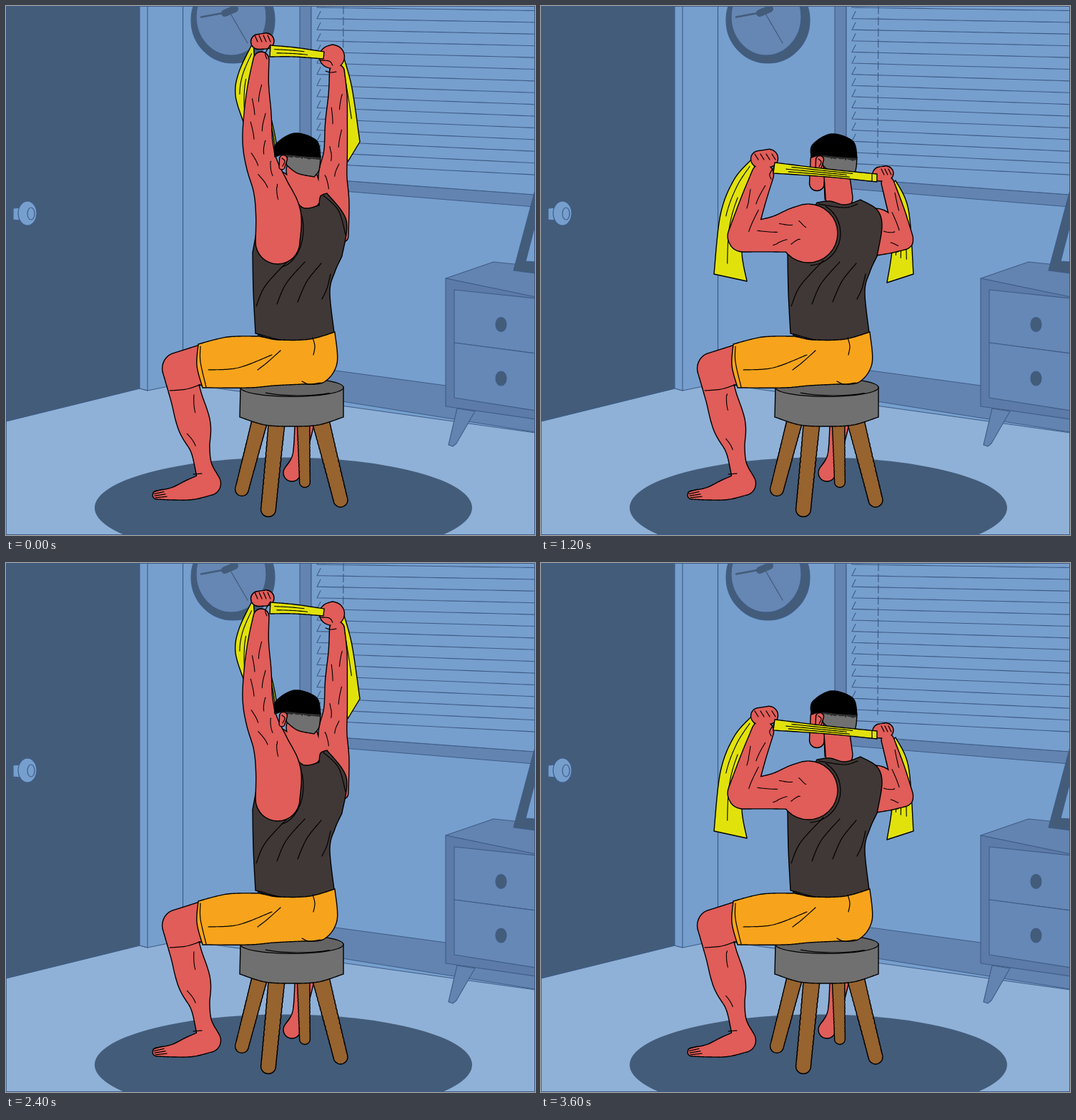
An HTML page with a canvas for the animation above (4800 ms loop, 740 by 740 pixels).

```html
<!DOCTYPE html>
<html lang="en">
<head>
<meta charset="utf-8">
<title>Seated overhead band stretch</title>
<style>
html, body { margin: 0; width: 100%; height: 100%; overflow: hidden; background: #769fce; }
canvas { display: block; width: 740px; height: 740px; }
</style>
</head>
<body>
<canvas id="stage" width="740" height="740"></canvas>
<script>
const ctx = document.getElementById('stage').getContext('2d');
const HOLD = 1200, TAU = Math.PI * 2, STEPS = 20;
const C = {
  wall: '#769fce', floor: '#8fb1d7', dark: '#435c7a', mid: '#6384b1', face: '#6686b3',
  front: '#5c7ba8', drawer: '#6688b6', edge: '#3f5c86', skin: '#e05d59', shorts: '#f7a41c',
  tank: '#403836', band: '#e1e20c', wood: '#97632f', seat: '#707070', top: '#646464', ink: '#000'
};
ctx.lineJoin = ctx.lineCap = 'round';

let seed = 1;
const random = () => (seed = seed * 16807 % 2147483647) / 2147483647;
const mix = (a, b, t) => a.map((v, k) => v + (b[k] - v) * t);

function points(text, size) {
  const n = text.trim().split(/\s+/).map(Number);
  return Array.from({ length: n.length / size }, (_, i) => n.slice(i * size, i * size + size));
}

// Dense samples of a Catmull-Rom spline, in any number of dimensions.
function spline(keys) {
  const out = [];
  for (let i = 0; i + 1 < keys.length; i++) {
    const b = keys[i], c = keys[i + 1], a = keys[i - 1] || b, d = keys[i + 2] || c;
    for (let s = 0; s <= STEPS; s++) {
      const t = s / STEPS;
      out.push(b.map((v, k) => v + t / 2 * (c[k] - a[k] + t * (2 * a[k] - 5 * v + 4 * c[k] - d[k]
        + t * (3 * v - a[k] - 3 * c[k] + d[k])))));
    }
  }
  return out;
}

// Smooth outline; "/" marks a sharp corner.
function outline(text) {
  const out = [];
  for (const part of text.split('/')) {
    const keys = points(part, 2);
    if (out.length) keys.unshift(out[out.length - 1]);
    out.push(...(keys.length > 1 ? spline(keys) : keys));
  }
  return out;
}

function paint(p, fill, stroke, width = 1.4) {
  if (fill) { ctx.fillStyle = fill; ctx.fill(p); }
  if (stroke) { ctx.strokeStyle = stroke; ctx.lineWidth = width; ctx.stroke(p); }
}

function draw(pts, fill, stroke = C.ink, width) {
  const p = new Path2D();
  for (const [x, y] of pts) p.lineTo(x, y);
  if (fill) p.closePath();
  paint(p, fill, stroke, width);
}

const shape = (text, fill) => draw(outline(text), fill);
const line = (text, color, width = 1.2) => draw(outline(text), null, color, width);
const poly = (text, fill) => draw(points(text, 2), fill, C.edge, 1.1);

// Panel with upright sides, given by the top and bottom of each side.
const slab = (x0, t0, b0, x1, t1, b1, fill) =>
  draw([[x0, t0], [x1, t1], [x1, b1], [x0, b0]], fill, C.edge, 1.1);

function oval(x, y, rx, ry, fill, stroke = C.edge, from = 0, to = TAU) {
  const p = new Path2D();
  p.ellipse(x, y, rx, ry, 0, from, to);
  paint(p, fill, stroke, 1.2);
}

// Rounded limbs (x, y, radius along a spine) joined into one outlined silhouette.
function merge(fill, ...limbs) {
  const runs = limbs.map(text => spline(points(text, 3)));
  for (const [color, grow] of [[C.ink, 0.7], [fill, -0.7]]) {
    const p = new Path2D();
    for (const [x, y, r] of runs.flat()) {
      p.moveTo(x, y);
      p.arc(x, y, r + grow, 0, TAU);
    }
    paint(p, color);
  }
  return runs;
}

// Short muscle lines that follow a limb.
function muscles(run, count) {
  for (let i = 0; i < count; i++) {
    const from = Math.floor(run.length * (0.12 + 0.62 * (i + random() * 0.5) / count));
    const side = (i % 2 ? 1 : -1) * (0.3 + random() * 0.35);
    const part = run.slice(from, from + 13);
    const end = part[part.length - 1], len = Math.hypot(end[0] - part[0][0], end[1] - part[0][1]);
    const nx = -(end[1] - part[0][1]) / len, ny = (end[0] - part[0][0]) / len;
    draw(part.map(([x, y, r], k) => {
      const off = r * (side - 0.25 * Math.sin(k / 8) * Math.sign(side));
      return [x + nx * off, y + ny * off];
    }), null, C.ink, 1.1);
  }
}

// Cloth between two edges, with creases running along it.
function cloth(one, two, creases) {
  const a = points(one, 2), b = points(two, 2);
  draw([...spline(a), ...spline(b).reverse()], C.band);
  for (let i = 1; i <= creases; i++) {
    const fold = spline(a.map((p, k) => mix(p, b[k], i / (creases + 1))));
    const from = Math.floor(fold.length * (0.08 + random() * 0.3));
    draw(fold.slice(from, from + Math.floor(fold.length * 0.55)), null, C.ink, 1.1);
  }
}

function fingers(x, y, step, dx, dy, count = 4) {
  for (let i = 0; i < count; i++) line(`${x + i * step} ${y} ${x + i * step + dx} ${y + dy}`);
}

function blinds() {
  for (let i = 0; i < 15; i++) {
    const y = 2 + i * 15.6;
    line(`440 ${y - 10} / 435 ${y} / 740 ${y + 4.5 + i * 0.8}`, C.edge, 1.1);
  }
  ctx.setLineDash([11, 4.6]);
  line('472 0 471 212', C.edge);
  ctx.setLineDash([]);
}

function clock() {
  oval(317.5, 20, 58.5, 60, C.dark);
  oval(315, 15, 49, 54, C.face);
  line('273 15.5 308 9', C.dark, 2.6);
  line('306 10 320 4', C.dark, 10);
  line('313 9 338 52', C.dark);
}

function room() {
  ctx.fillStyle = C.wall;
  ctx.fillRect(0, 0, 740, 740);
  poly('0 581 187 535 198 538 247 528 740 597 740 740 0 740', C.floor);
  slab(0, 0, 581, 187, 0, 535, C.dark);
  slab(187, 0, 535, 198, 0, 538, C.wall);
  line('247.5 0 247.5 528', C.edge);
  slab(300, 488, 526, 740, 548, 596, C.mid);

  slab(411, 0, 254, 427, 0, 256, C.mid);
  slab(411, 240, 254, 740, 264, 281, C.mid);
  slab(427, -1, 241, 741, -1, 264, C.wall);
  blinds();
  clock();

  slab(10, 283, 299, 20, 282, 300, C.wall);
  oval(30, 290, 13, 17, C.wall);
  oval(35, 290.5, 5, 8.5);

  poly('631 563 656 567 630 612 625 616 619 614', C.mid);
  poly('615 381 682 358 740 364 740 407', C.mid);
  slab(615, 381, 560, 741, 407, 578, C.front);
  slab(627, 397, 471, 741, 409, 486, C.drawer);
  slab(627, 471, 548, 741, 486, 566, C.drawer);
  for (const y of [445.5, 521]) oval(692.5, y, 7.5, 10, C.dark);
  poly('741 254 710 370 741 374', C.dark);
  poly('741 303 727 357 741 358', C.wall);
  oval(388, 702, 264, 70.5, C.dark, null);
}

function stool() {
  merge(C.skin, '417 588 13 410 630 9.5 400 653 12');
  for (const leg of ['416 580 9 418 666 7.5', '355 580 11 330 676 9.5', '440 580 12 468 691 10', '379 580 11.5 367 704 10.5'])
    merge(C.wood, leg);
  shape('328 533 / 327 575 / 362 586 400 588 437 586 472 575 / 472 533', C.seat);
  oval(400, 533.5, 72, 13, C.top, C.ink);
  oval(409, 533, 62, 12, null, C.ink, 0.8, 2.4);
}

function lowerBody() {
  const [shin] = merge(C.skin, '241 507 22.5 252 547 22 263 585 23 271 617 14 276 643 12 284 667 16',
    '241 507 22.5 275 502 28', '284 668 16.5 260 676 14.5 235 682 9 211 684 6');
  muscles(shin, 2);
  for (let i = 0; i < 4; i++) line(`${206 + i} ${680 + i * 2.6} ${219 + i * 2} ${676 + i * 3.4}`);
  line('262 655 274 654');
  line('229 538 252 536 271 530');
  shape(`269 473 310 463 354 462 / 384 467 425 466 460 456 / 463 500 445 526 415 529 / 375 531 340 534 275 534
    / 267 503 269 473`, C.shorts);
  line('272 476 272 498 280 533');
  line('283 509 325 506 372 488');
  line('352 509 365 499 384 482');
  line('352 460 372 466 384 467');
  line('429 464 432 476 430 488');
  line('414 525 424 529 440 527');
}

function tank(neck) {
  shape(`${neck} / 460 372 453 400 459 457 / 405 470 349 458 / 346 400 345 345`, C.tank);
  for (let i = 0; i < 3; i++) {
    const x = 350 + i * 29, y = 420 - i * 3;
    line(`${x} ${y} ${x + 13} ${y - 29} ${x + 45 - i * 6} ${y - 64 + i * 5}`);
  }
  line('442 410 449 395 454 375');
}

function head(x, y) {
  ctx.save();
  ctx.translate(x, y);
  shape('388 207 / 440 211 / 438 229 431 239 / 408 234 393 223', C.seat);
  shape('376 211 378 193 404 178 434 188 440 211 / 410 209 390 206', C.ink);
  for (let t = 0; t < 1; t += 0.04) line(`${390 + 50 * t} ${207 + 5 * t} ${390 + 50 * t} ${209 + 5 * t + random() * 2}`);
  merge(C.skin, '388 214 5.5 386 225 4');
  line('386 213 390 217 387 224');
  ctx.restore();
}

function armsUp() {
  cloth('346 50 326 92 321 125 333 165', '348 80 341 105 339 135 336 165', 2);
  cloth('362 145 372 172 377 203', '368 145 376 180 380 206', 0);
  cloth('472 70 484 115 495 190', '465 90 468 150 478 218', 2);
  const [far] = merge(C.skin, '463 92 10.5 464 125 13 462 165 15.5 461 205 16.5 457 238 20 460 275 20 470 322 9',
    '454 71 15.5 457 71 16.5', '412 230 20 418 255 22 422 264 20', '385 240 8 405 255 8');
  muscles(far, 6);
  tank('350 318 / 380 290 / 397 259 / 415 282 438 279 / 440 266 449 262 / 476 300 470 350');
  oval(379, 312, 37, 54, null, C.ink, -0.7, 1.4);
  line('444 265 465 286 475 320');
  const [near] = merge(C.skin, '357 75 11 353 110 14.5 352 150 19 352 190 21 358 222 22 371 256 25 381 292 31.5 380 330 31',
    '353 50 10.5 364 49 11');
  muscles(near, 9);
  fingers(348, 41, 6, 4, 9);
  line('370 54 363 66 365 74');
  cloth('370 55 404 58 445 64', '369 71 404 71 444 74', 2);
  line('439 76 452 77 457 83');
  line('447 91 454 93 462 92');
  head(0, 0);
}

function armsDown() {
  cloth('295 214 270 243 251 292 242 375', '302 235 285 300 281 345 288 385', 4);
  cloth('496 244 514 285 521 375', '490 250 492 330 484 387', 3);
  const [fore, upper] = merge(C.skin, '485 248 9 497 287 11.5 508 325 12.5', '508 328 12.5 491 324 21 467 316 33',
    '474 235 10 483 234 10');
  muscles(fore, 2);
  muscles(upper, 2);
  fingers(476, 228, 5, 4, 8, 3);
  merge(C.skin, '386 214 9 386 248 10.5', '414 240 18 417 268 19');
  line('396 246 397 271');
  tank('345 345 / 386 275 / 404 273 425 278 447 271 / 470 285 477 308 470 350');
  oval(374, 318, 45, 45, null, C.ink, -1, 1.5);
  line('388 277 424 282 443 277');
  const [lower, shoulder] = merge(C.skin, '310 236 15.5 296 275 17.5 281 322 20',
    '282 324 20 329 319 25 358 314 32 374 318 41', '305 214 11.5 319 213 12.5');
  muscles(lower, 3);
  muscles(shoulder, 5);
  fingers(299, 207, 8, 5, 8);
  line('327 224 320 235 322 242');
  head(2, 1);
  cloth('327 219 400 228 470 235', '325 234 400 239 470 246', 3);
  line('463 235 463 245');
}

function render(pose) {
  seed = 7;
  room();
  stool();
  pose();
  lowerBody();
  ctx.lineWidth = 1;
  ctx.strokeStyle = C.edge;
  ctx.strokeRect(0.5, 0.5, 739, 739);
}

const poses = [armsUp, armsDown], start = performance.now();
let shown;
function tick() {
  const pose = poses[Math.floor((performance.now() - start) / HOLD) % 2];
  if (pose !== shown) render(shown = pose);
  requestAnimationFrame(tick);
}
tick();
</script>
</body>
</html>
```
